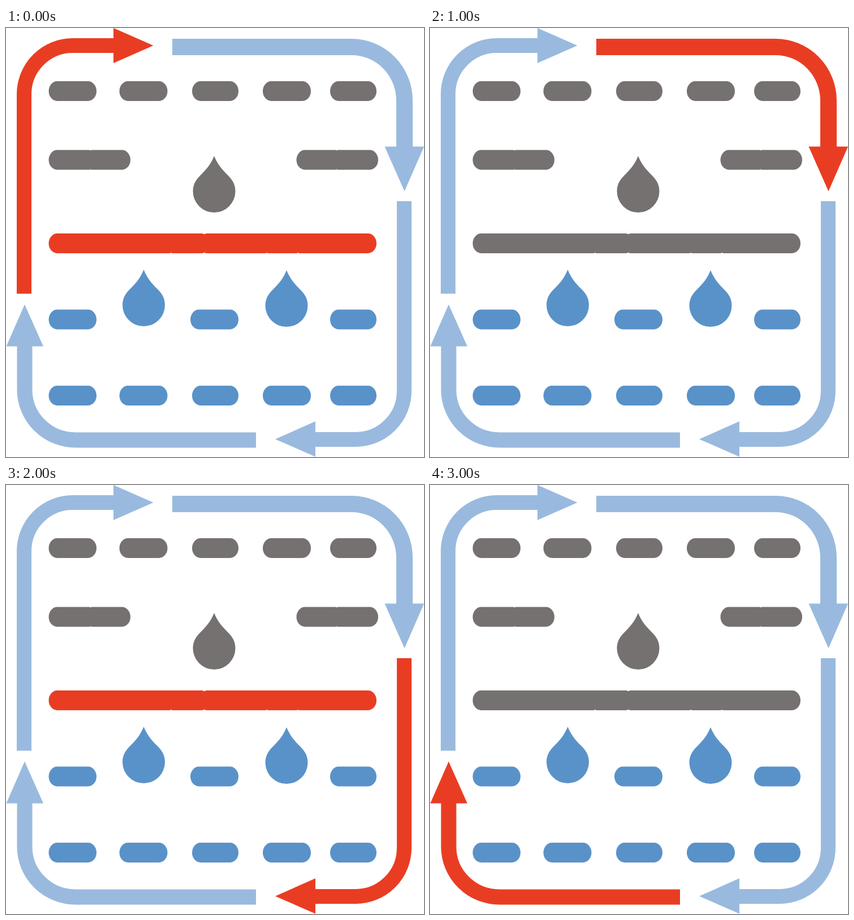
An HTML page for the animation above (4000 ms loop, 739 px wide and 758 px high).

```html
<!DOCTYPE html>
<html lang="en">
<head>
<meta charset="utf-8">
<title>Cycle</title>
<style>
  :root { --red: #e93d23; --pale: #99bade; --gray: #757170; --blue: #5992c9; }
  html, body { margin: 0; width: 100%; height: 100%; overflow: hidden; background: #fff; }
  svg { display: block; width: 100%; height: 100%; }
  .arrow { color: var(--pale); animation: turn 4s step-end infinite; }
  .arrow path { fill: none; stroke: currentColor; }
  .arrow polygon { fill: currentColor; }
  .right { animation-delay: -3s; }
  .down { animation-delay: -2s; }
  .left { animation-delay: -1s; }
  .gray { fill: var(--gray); }
  .blue { fill: var(--blue); }
  .band { animation: blink 2s step-end infinite; }
  .nick { fill: #fff; }
  @keyframes turn { 0% { color: var(--red); } 25%, 100% { color: var(--pale); } }
  @keyframes blink { 0% { fill: var(--red); } 50%, 100% { fill: var(--gray); } }
</style>
</head>
<body>
<svg viewBox="0 0 739 758">
  <defs>
    <path id="drop" d="M0 0C6 15 14 24 24 34C32 42 37.5 50 37.5 62.5A37.5 37.5 0 0 1-37.5 62.5C-37.5 50-32 42-24 34C-14 24-6 15 0 0Z"/>
  </defs>

  <g class="arrow">
    <path stroke-width="26" d="M32 469.500V117A86 86 0 0 1 118 31H191"/>
    <polygon points="190,0 260.500,31 190,62"/>
  </g>
  <g class="arrow right">
    <path stroke-width="29" d="M294 33.500H611A93.500 95 0 0 1 704.500 128.500V211"/>
    <polygon points="669.500,209.500 739,209.500 704.500,288.500"/>
  </g>
  <g class="arrow down">
    <path stroke-width="26" d="M704 306V641A86 86 0 0 1 618 727H546"/>
    <polygon points="547,695 476,726.500 547,757.500"/>
  </g>
  <g class="arrow left">
    <path stroke-width="27" d="M442 728H123A90 89 0 0 1 33 639V562"/>
    <polygon points="0.500,562.500 66,562.500 33,488.500"/>
  </g>

  <g class="gray">
    <g id="row">
      <rect x="75.500" y="94" width="84.500" height="35" rx="15" ry="17.500"/>
      <rect x="200.500" y="94" width="85" height="35" rx="15" ry="17.500"/>
      <rect x="329" y="94" width="82" height="35" rx="15" ry="17.500"/>
      <rect x="454" y="94" width="85" height="35" rx="15" ry="17.500"/>
      <rect x="573" y="94" width="82" height="35" rx="15" ry="17.500"/>
    </g>
    <rect x="75.500" y="215.500" width="144.500" height="35" rx="15" ry="17.500"/>
    <rect x="513.500" y="215.500" width="144.500" height="35" rx="15" ry="17.500"/>
    <use href="#drop" x="368" y="226"/>
  </g>

  <rect class="band" x="75.500" y="363" width="579.500" height="35" rx="15" ry="17.500"/>
  <path class="nick" d="M147 215.500h5l-2.500 1zM147 250.500h5l-2.500-1zM582 215.500h5l-2.500 1zM582 250.500h5l-2.500-1zM347 363h7l-3.500 1.200zM347 398h7l-3.500-1.200zM290 398h4l-2-1zM459 398h4l-2-1zM514 398h4l-2-1z"/>

  <g class="blue">
    <use href="#drop" x="243.500" y="427"/>
    <use href="#drop" x="496" y="428"/>
    <rect x="75.500" y="497.500" width="84.500" height="35" rx="15" ry="17.500"/>
    <rect x="326" y="497.500" width="85" height="35" rx="15" ry="17.500"/>
    <rect x="573" y="497.500" width="82" height="35" rx="15" ry="17.500"/>
    <use href="#row" y="538"/>
  </g>
</svg>
</body>
</html>
```
